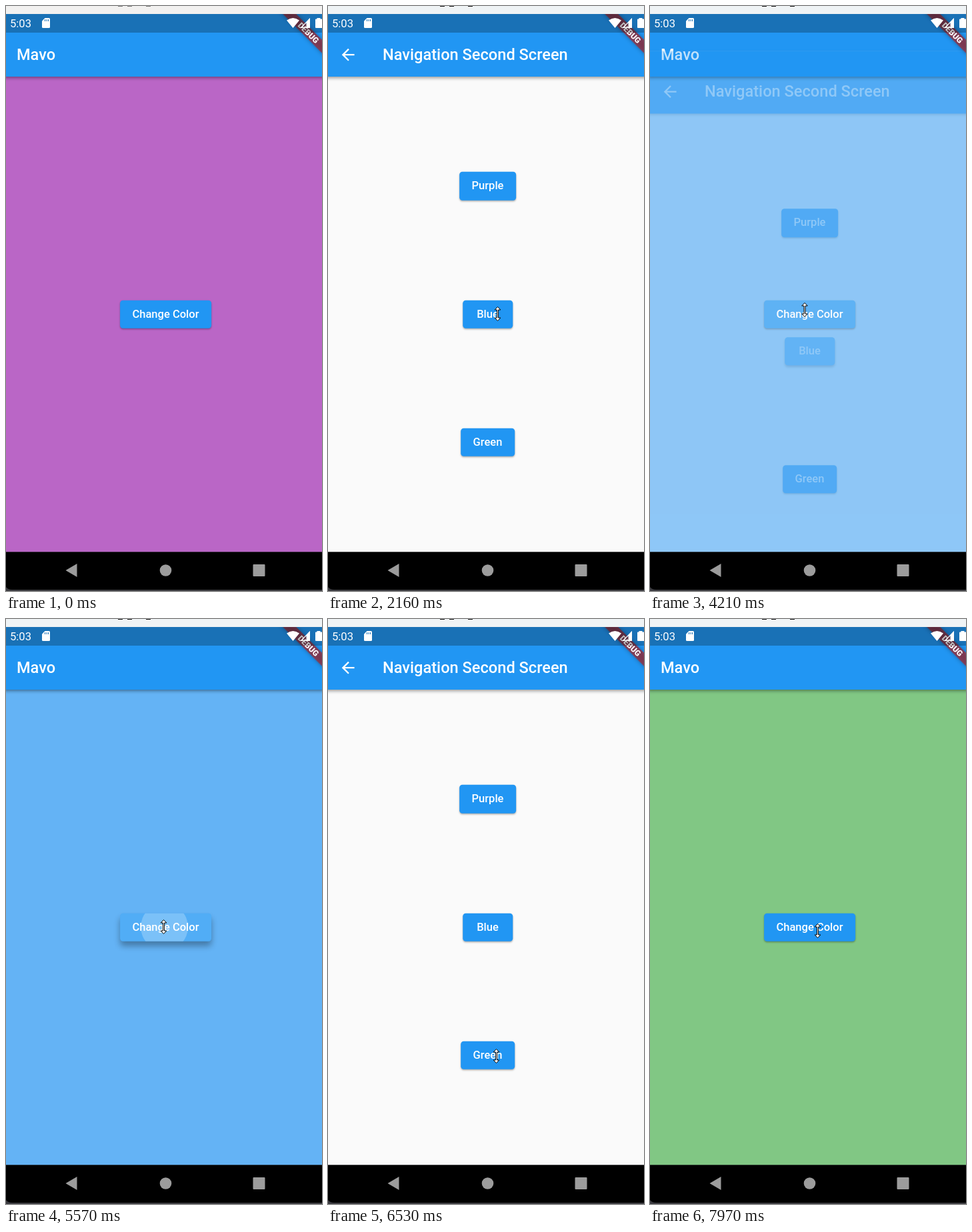
Recreate the animation shown at these times as an HTML page. Size 474 by 878 pixels, loop 8000 ms.

```html
<!DOCTYPE html>
<html lang="en">
<head>
<meta charset="utf-8">
<title>Color picker navigation</title>
<style>
html, body { margin: 0; width: 100%; height: 100%; overflow: hidden; }
body { position: relative; background: #000; color: #fff; font-family: Roboto, sans-serif; }
#strip { position: absolute; top: 0; left: 0; width: 474px; height: 12px; }
#strip i { position: absolute; top: 0; width: 7px; height: 1px; background: currentColor; }
#app { position: absolute; top: 12px; left: -3px; width: 485px; height: 808px; overflow: hidden; }
.page { position: absolute; inset: 0; }
.bar { position: absolute; inset: 0 0 auto; height: 93.6px; background: #2196f3; box-shadow: 0 2px 5px rgba(0,0,0,.4); }
.bar b { position: absolute; left: 18.9px; top: 28px; font: 500 23.6px/67px Roboto, sans-serif; white-space: nowrap; }
#second { background: #fafafa; }
#second b { left: 85px; }
.bar svg { position: absolute; left: 18.9px; top: 46.8px; }
.btn { position: absolute; left: 242.5px; height: 42.5px; transform: translate(-50%, -50%); min-width: 75.5px;
  padding: 0 18.9px; box-sizing: border-box; border-radius: 4.5px; background: #2196f3; text-align: center;
  font: 500 16.52px/42.5px Roboto, sans-serif; white-space: nowrap; }
.ink { position: absolute; inset: 0; border-radius: inherit; overflow: hidden; }
.ink i { position: absolute; border-radius: 50%; background: #fff; }
.btn span { position: relative; }
svg.over { position: absolute; left: 0; top: 0; }
</style>
</head>
<body>
<div id="strip"><i style="left:168px"></i><i style="left:182px"></i><i style="left:210px"></i></div>
<div id="app">
  <div class="page" id="first"><div class="bar"><b>Mavo</b></div></div>
  <div class="page" id="second">
    <div class="bar">
      <svg width="28.3" height="28.3" viewBox="0 0 24 24"><path fill="#fff" d="M20 11H7.83l5.59-5.59L12 4l-8 8 8 8 1.41-1.41L7.83 13H20z"/></svg>
      <b>Navigation Second Screen</b>
    </div>
  </div>
</div>
<svg class="over" width="474" height="878">
  <clipPath id="screen"><path d="M0 12H474V819H0z"/></clipPath>
  <g clip-path="url(#screen)">
    <g transform="translate(482 12) rotate(45)">
      <rect x="-60" y="33" width="120" height="14.2" fill="#b71c1c" fill-opacity=".63" style="filter:drop-shadow(0 0 3px rgba(0,0,0,.5))"/>
      <text y="44.3" text-anchor="middle" font-size="12" font-weight="900" fill="#fff">DEBUG</text>
    </g>
  </g>
  <path d="M0 12H474V40H0z" fill-opacity=".25"/>
  <g fill="#fff">
    <text x="6" y="32.3" font-size="16.6">5:03</text>
    <path d="M58.5 18H64.5Q66 18 66 19.5V31.5Q66 33 64.5 33H55.5Q54 33 54 31.5V22.5z"/>
    <path d="M421 21.5Q430.5 14.5 440 21.5L430.5 33z"/>
    <path d="M455.2 19.5V32.3H442.8z" fill="none" stroke="#fff" stroke-width="1.3"/>
    <path d="M450.5 24.5L456 18V33H450.5z"/>
    <path d="M466.5 18H471.5V19.5H474V33H465Q464 33 464 32V20.5Q464 19.5 465 19.5H466.5z"/>
  </g>
  <path d="M58.5 20V23M61 20V23M63.5 20V23" stroke="#1971b7"/>
  <path d="M0 819.5H474V878H0z" fill="#3b3b40"/>
  <path d="M0 819.5H474V876H9Q3 876 0 872z"/>
  <g fill="#9c9c9c">
    <path d="M89.5 847L106.500 837V857z"/>
    <circle cx="239.5" cy="847" r="8.8"/>
    <rect x="370.5" y="838" width="18" height="18" rx="1"/>
  </g>
  <path id="cursor" d="M0-10.5L4.300-6H1V6H4.300L0 10.500-4.300 6H-1V-6H-4.300z" fill="#fff" stroke="#000"/>
</svg>
<script>
const $ = id => document.getElementById(id);
const LOOP = 8000, PAGE_H = 807, CENTER_X = 239.5, FOCUS = 1540;
const clamp = v => Math.max(0, Math.min(1, v));
const mix = (a, b, k) => a + (b - a) * k;
const easeOut = k => 1 - (1 - k) ** 3;

function bezier(x1, y1, x2, y2) {
  const at = (a, b, s) => 3 * a * s * (1 - s) ** 2 + 3 * b * s * s * (1 - s) + s ** 3;
  return x => {
    let lo = 0, hi = 1;
    for (let i = 0; i < 24; i++) {
      const mid = (lo + hi) / 2;
      if (at(x1, x2, mid) < x) lo = mid; else hi = mid;
    }
    return at(y1, y2, hi);
  };
}
const ease = bezier(.25, .1, .25, 1), easeIn = bezier(.42, 0, 1, 1), slide = bezier(.4, 0, .2, 1);

// Pointer moves: start, end, x, y
const moves = [
  [250, 390, 328, 625], [650, 1210, 254.5, 462],
  [2350, 2700, 240, 307], [2700, 3130, 230, 522], [3130, 3540, 232, 456],
  [4750, 4960, 236.5, 462], [5920, 6530, 252.5, 656], [7690, 7970, 251.5, 468]
];
function pointer(t) {
  let x = 405, y = 866;
  for (const [from, to, tx, ty] of moves) {
    const k = easeOut(clamp((t - from) / (to - from)));
    x = mix(x, tx, k);
    y = mix(y, ty, k);
  }
  return [x, y];
}

// Every tap switches the page when it is released
const taps = [
  { label: 'Change Color', down: 1630, up: 1850 },
  { label: 'Blue', down: 3800, up: 4050, color: '#64b3f5' },
  { label: 'Change Color', down: 5390, up: 5620 },
  { label: 'Green', down: 6850, up: 7190, color: '#81c784' }
];

function button(page, label, row) {
  const el = document.createElement('div'), y = 450.6 + 192.3 * row;
  el.className = 'btn';
  el.style.top = y + 'px';
  el.innerHTML = `<div class="ink"><i></i></div><span>${label}</span>`;
  $(page).append(el);
  return { el, y, ink: el.firstChild, dot: el.querySelector('i'), taps: taps.filter(p => p.label === label) };
}
const buttons = [
  button('first', 'Change Color', 0),
  ...['Purple', 'Blue', 'Green'].map((label, i) => button('second', label, i - 1))
];

function drawButton({ el, y, ink, dot, taps }, t) {
  const tap = taps.find(p => t >= p.down && t < p.up + 375);
  let glow = 0;
  dot.style.opacity = 0;
  if (tap) {
    const { down, up } = tap, w = el.offsetWidth, h = 42.5;
    const k = ease(clamp((Math.min(t, up) - down) / 1000 + Math.max(0, t - up) / 225));
    const reach = Math.hypot(w, h) / 2, r = mix(reach * .3, reach + 5, k);
    const [px, py] = pointer(down);
    const x = w / 2 + (px - CENTER_X) * (1 - k), cy = h / 2 + (py - 12 - y) * (1 - k);
    glow = clamp((t - down) / 200) * (1 - clamp((t - up) / 200));
    Object.assign(dot.style, {
      left: x - r + 'px', top: cy - r + 'px', width: 2 * r + 'px', height: 2 * r + 'px',
      opacity: .24 * clamp((t - down) / 75) * (1 - clamp((t - up - 225) / 150))
    });
  }
  ink.style.background = `rgba(255,255,255,${.24 * glow})`;
  el.style.boxShadow = `0 ${mix(1.5, 7.5, glow)}px ${mix(2.5, 10, glow)}px rgba(0,0,0,.32)`;
}

function draw(t) {
  const [x, y] = pointer(t), focused = t >= FOCUS;
  let open = 0, color = '#ba66c6';
  taps.forEach((tap, i) => {
    open += (i % 2 ? -1 : 1) * clamp((t - tap.up) / 300);
    if (tap.color && t >= tap.up) color = tap.color;
  });
  $('strip').style.background = focused ? '#eff3f5' : '#f2f1f0';
  $('strip').style.color = focused ? '#111' : '#777';
  $('first').style.background = color;
  $('second').style.visibility = open > 0 ? 'visible' : 'hidden';
  $('second').style.opacity = easeIn(open);
  $('second').style.transform = `translateY(${PAGE_H * .25 * (1 - slide(open))}px)`;
  buttons.forEach(b => drawButton(b, t));
  $('cursor').setAttribute('transform', `translate(${x} ${y})`);
  $('cursor').style.display = t < moves[0][0] ? 'none' : '';
}

const begin = performance.now();
function tick() {
  draw((performance.now() - begin) % LOOP);
  requestAnimationFrame(tick);
}
tick();
</script>
</body>
</html>
```
